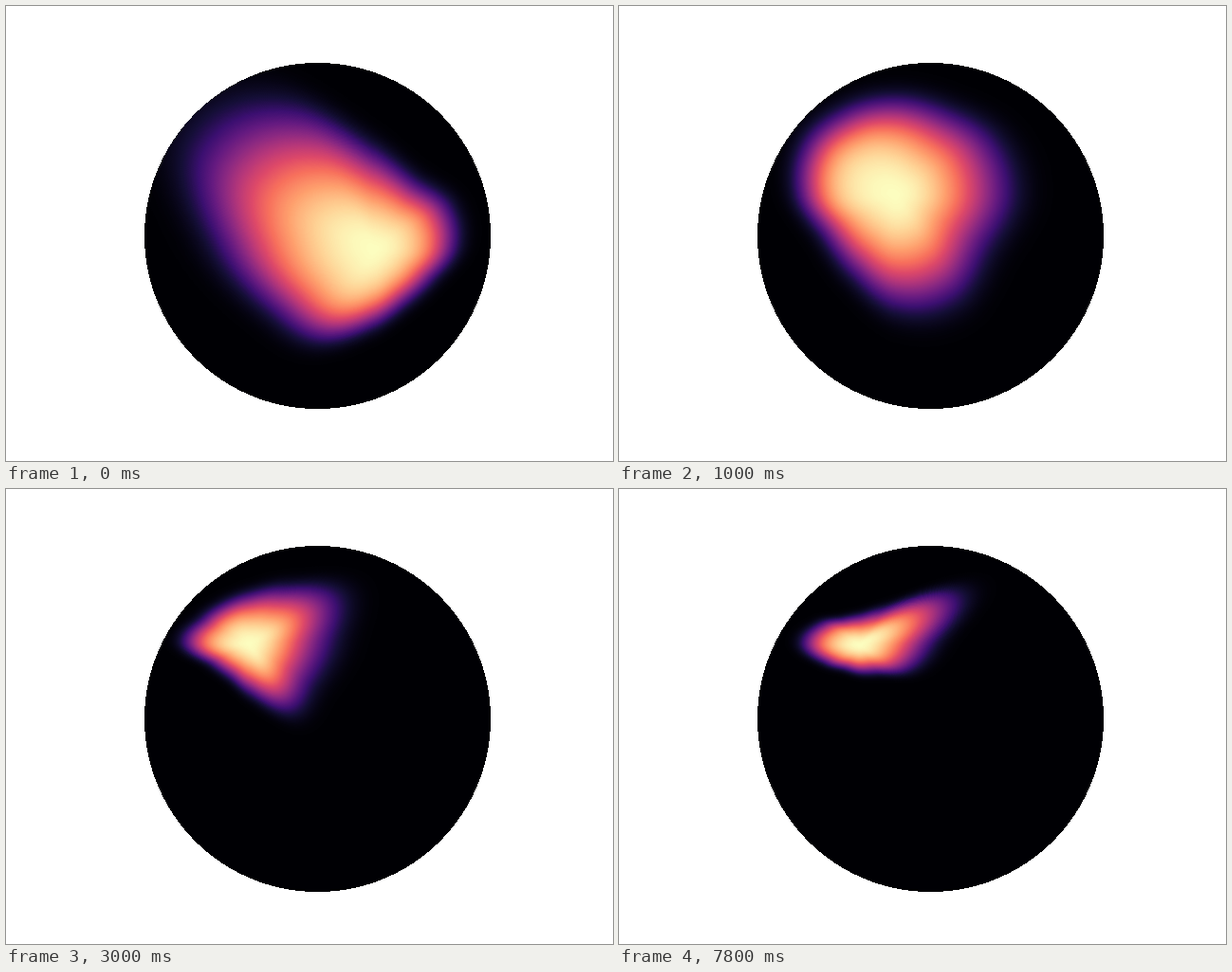
These frames come from a looping animation (640 px wide and 480 px high, 8000 ms). An HTML page with a canvas:

```html
<!DOCTYPE html>
<html lang="en">
<head>
<meta charset="utf-8">
<title>Density on a disc</title>
<style>
  html, body { margin: 0; width: 100%; height: 100%; overflow: hidden; background: #fff; }
  canvas { display: block; width: 640px; height: 480px; }
</style>
</head>
<body>
<canvas id="stage" width="640" height="480"></canvas>
<script>
const LOOP = 8000, STEP = 200;
const DISC = { x: 328, y: 242, r: 182.5 };
const ANGLES = 720;

// Each pose: peak position, reach of the glow every 30 degrees clockwise
// from the right, and the half-height share of that reach every 60 degrees.
const poses = [
  { step: 0, peak: [388, 256],
    reach: [91, 73, 71, 86, 117, 135, 174, 228, 184, 112, 90, 97],
    half: [.76, .77, .77, .73, .68, .75] },
  { step: 3, peak: [323, 220],
    reach: [138, 121, 126, 138, 124, 119, 141, 158, 148, 132, 116, 121],
    half: [.74, .73, .74, .78, .8, .76] },
  { step: 7, peak: [258, 178],
    reach: [124, 118, 141, 113, 77, 67, 77, 75, 74, 85, 106, 132],
    half: [.6, .66, .74, .8, .77, .7] },
  { step: 11, peak: [255, 163],
    reach: [102, 101, 112, 77, 56, 54, 71, 60, 56, 64, 84, 117],
    half: [.62, .66, .73, .76, .77, .7] },
  { step: 15, peak: [256, 163],
    reach: [94, 84, 87, 56, 44, 48, 74, 60, 54, 57, 74, 112],
    half: [.61, .67, .73, .75, .76, .7] },
  { step: 23, peak: [260, 164],
    reach: [82, 68, 62, 46, 40, 47, 78, 58, 50, 50, 65, 108],
    half: [.63, .68, .73, .74, .76, .69] },
  { step: 39, peak: [253, 164],
    reach: [83, 60, 37, 32, 32, 43, 64, 50, 35, 34, 47, 118],
    half: [.66, .7, .73, .74, .74, .68] }
];

const magma = ['000004', '140e36', '3b0f70', '641a80', '8c2981', 'b73779',
  'de4968', 'f7705c', 'fe9f6d', 'fecf92', 'fcfdbf']
  .map(hex => [0, 2, 4].map(i => parseInt(hex.slice(i, i + 2), 16)));

const mix = (a, b, t) => a + (b - a) * t;
const mixAll = (a, b, t) => a.map((v, i) => mix(v, b[i], t));

// Packed ABGR palette
const palette = Uint32Array.from({ length: 256 }, (_, i) => {
  const p = i / 255 * (magma.length - 1);
  const k = Math.min(Math.floor(p), magma.length - 2);
  const [r, g, b] = mixAll(magma[k], magma[k + 1], p - k).map(Math.round);
  return (255 << 24 | b << 16 | g << 8 | r) >>> 0;
});

// Closed Catmull-Rom curve, turn in 0..1
function ring(values, turn) {
  const n = values.length, p = turn * n, k = Math.floor(p), t = p - k;
  const [a, b, c, d] = [-1, 0, 1, 2].map(o => values[(k + o + n) % n]);
  return b + t / 2 * (c - a + t * (2 * a - 5 * b + 4 * c - d + t * (3 * (b - c) + d - a)));
}

function poseAt(step) {
  let i = 0;
  while (i < poses.length - 2 && step >= poses[i + 1].step) i++;
  const a = poses[i], b = poses[i + 1];
  const t = (step - a.step) / (b.step - a.step);
  return {
    peak: mixAll(a.peak, b.peak, t),
    reach: mixAll(a.reach, b.reach, t),
    half: mixAll(a.half, b.half, t)
  };
}

const ctx = document.getElementById('stage').getContext('2d');
const picture = ctx.createImageData(640, 480);
const pixels = new Uint32Array(picture.data.buffer);
pixels.fill(0xffffffff);

function draw(step) {
  const { peak: [px, py], reach, half } = poseAt(step);
  const inverse = reach.map(r => 1 / r);
  const scale = new Float64Array(ANGLES);
  const bend = new Float64Array(ANGLES);
  const edge = Math.LN10;

  // Fall-off a*u^2 + c*u^6 meets one half at q and one tenth at u = 1.
  for (let i = 0; i < ANGLES; i++) {
    scale[i] = ring(inverse, i / ANGLES) ** 2;
    const q = ring(half, i / ANGLES);
    bend[i] = Math.min(edge, (edge * q * q - Math.LN2) / (q * q - q ** 6));
  }

  const { x: cx, y: cy, r } = DISC;
  for (let y = Math.floor(cy - r); y <= cy + r; y++) {
    for (let x = Math.floor(cx - r); x <= cx + r; x++) {
      if ((x - cx) ** 2 + (y - cy) ** 2 > r * r) continue;
      const dx = x - px, dy = y - py;
      const turn = Math.atan2(dy, dx) / (2 * Math.PI) + 1;
      const i = Math.round(turn * ANGLES) % ANGLES;
      const u2 = (dx * dx + dy * dy) * scale[i];
      const fall = (edge - bend[i]) * u2 + bend[i] * u2 ** 3;
      pixels[y * 640 + x] = palette[Math.round(255 * Math.exp(-fall))];
    }
  }
  ctx.putImageData(picture, 0, 0);
}

let shown = -1;
function tick() {
  const step = Math.floor(performance.now() % LOOP / STEP);
  if (step !== shown) draw(shown = step);
  requestAnimationFrame(tick);
}
tick();
</script>
</body>
</html>
```
